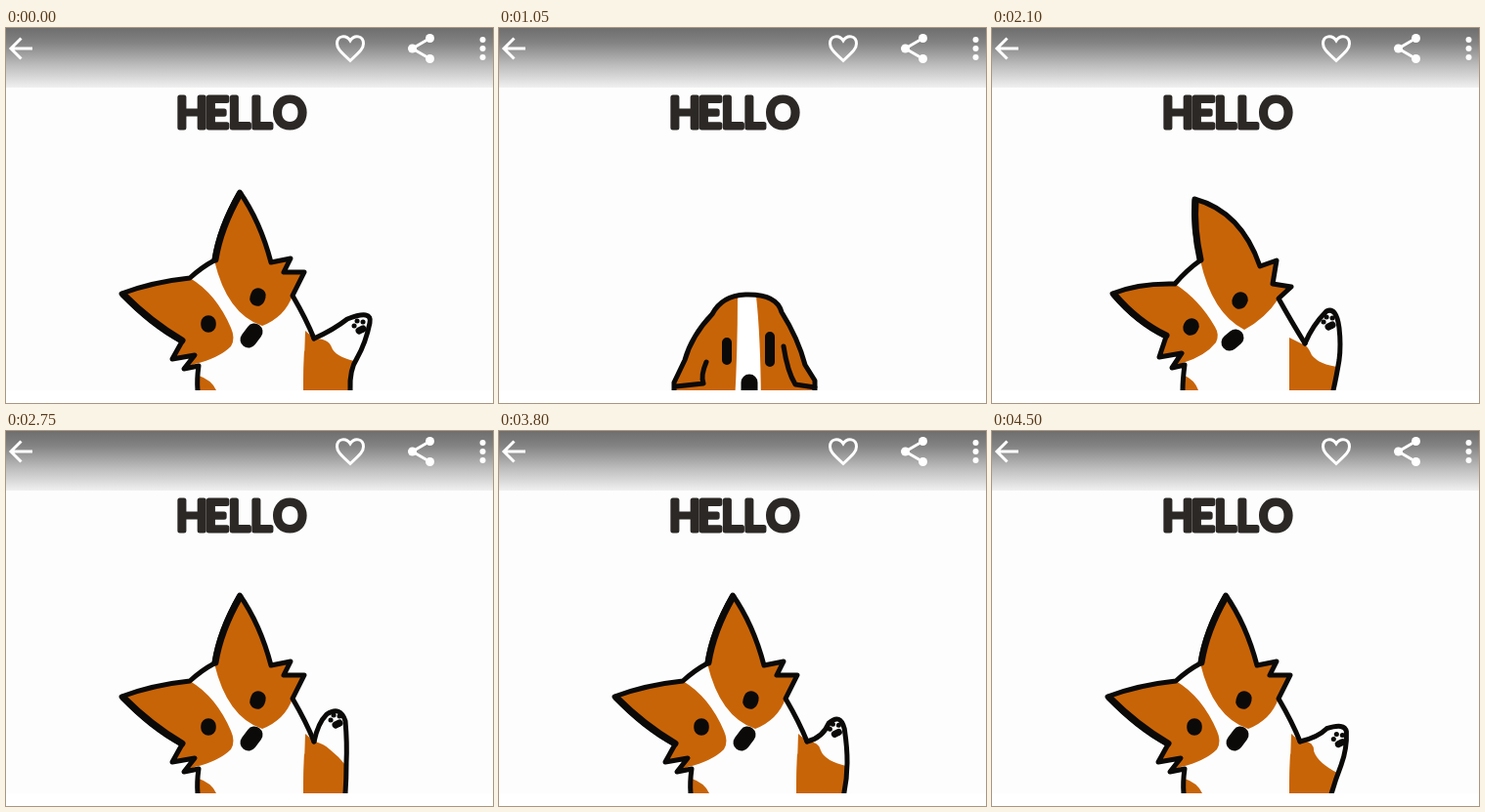
Recreate the animation shown at these times as an HTML page. Size 498 by 384 pixels, loop 4.55 s.

```html
<!DOCTYPE html>
<html lang="en">
<head>
<meta charset="utf-8">
<title>Waving corgi</title>
<style>
  html, body { margin: 0; width: 100%; height: 100%; overflow: hidden; background: #fff; }
  svg { display: block; width: 498px; height: 384px; }
  .fur { fill: #c86408; }
  .ink { fill: none; stroke: #0b0a09; stroke-width: 5; stroke-linecap: round; stroke-linejoin: round; }
  .bold { stroke-width: 7; }
  .slit { stroke-width: 10; }
  .eye { stroke-width: 15.5; }
  .nose { stroke-width: 17; }
  .icon { fill: none; stroke: #fff; stroke-width: 3; }
  .solid { fill: #fff; stroke: none; }
  text {
    font: 400 42px Lato, Inter, sans-serif;
    fill: #2b2826; stroke: #2b2826; stroke-width: 5; stroke-linejoin: round;
  }
</style>
</head>
<body>
<svg viewBox="0 0 498 384">
  <defs>
    <linearGradient id="shade" x2="0" y2="1">
      <stop offset="0" stop-color="#6e6e6e"/>
      <stop offset=".25" stop-color="#838383"/>
      <stop offset=".65" stop-color="#c0c0c0"/>
      <stop offset="1" stop-color="#f0f0f0"/>
    </linearGradient>
  </defs>
  <rect width="498" height="371" fill="#fcfdfc"/>
  <rect width="498" height="61" fill="url(#shade)"/>

  <g class="icon">
    <path d="M27 21H6M15.500 10.500L5 21L15.500 31.500"/>
    <path d="M352 33.500C341 23.500 338.500 20.500 338.500 16C338.500 7.500 348 6.500 352 13C356 6.500 365.500 7.500 365.500 16C365.500 20.500 363 23.500 352 33.500Z"/>
    <path d="M433.500 10.500L415.500 21L433.500 31.500"/>
    <g class="solid">
      <circle cx="433.500" cy="10.500" r="4.500"/>
      <circle cx="415.500" cy="21" r="4.500"/>
      <circle cx="433.500" cy="31.500" r="4.500"/>
      <circle cx="487.500" cy="12" r="3"/>
      <circle cx="487.500" cy="21" r="3"/>
      <circle cx="487.500" cy="30" r="3"/>
    </g>
  </g>
  <text x="174 203.500 227.500 250 273.500" y="102">HELLO</text>

  <g id="peek">
    <path class="fur" d="M178 400V363L190 340Q197 315 218 293Q228 274 252 273Q284 272 289 291Q306 318 313 345L323 361V400Z"/>
    <path fill="#fff" d="M244 275H263Q268 320 268 400H240Q244 340 244 275Z"/>
    <path class="ink" d="M179 371V363L190 340Q197 315 218 293Q228 274 252 273Q284 272 289 291Q306 318 313 345L323 361V371"/>
    <path class="ink" d="M212 342Q206 356 209 364L181 367M291 326Q295 352 303 365L323 368"/>
    <path class="ink slit" d="M233 322V340M277 316V342"/>
    <path class="ink nose" d="M256 363V400"/>
  </g>

  <g id="dog">
    <g id="arm">
      <path class="fur" id="sleeve"/>
      <path class="ink" id="paw"/>
      <g id="pads">
        <path class="ink" d="M-5 0h.1M-2 -5h.1M4 -4h.1"/>
        <path class="ink bold" d="M0 5L4 3"/>
      </g>
    </g>
    <path class="fur" id="belly"/>
    <path class="fur" id="left"/>
    <path class="fur" id="right"/>
    <path class="ink" id="outline"/>
    <path class="ink bold" id="rim"/>
    <path class="ink eye" id="eyes"/>
    <path class="ink nose" id="nose"/>
  </g>
  <rect y="371" width="498" height="13" fill="#fff"/>
</svg>
<script>
const LOOP = 4550, WAVE = 330;
const el = id => document.getElementById(id);

// Poses share one command structure, so any two can be blended.
const upright = {
  belly: 'M196 337Q205 350 211 371L189 371ZM321 329Q308 345 305 371L331 371Z',
  left: 'M192 177Q222 186 244 230Q248 265 247 300Q247 308 246 315Q220 319 196 309L181 302L185 295L171 289L193 281Q189 240 192 177Z',
  right: 'M268 235Q292 206 323 186Q328 230 324 276L338 291L320 300L319 301L318 302Q292 316 272 308Q267 270 268 235Z',
  outline: 'M188 371Q190 340 196 311L181 302L185 295L171 289L193 281Q189 240 192 177Q222 186 244 230Q258 237 271 232Q292 206 323 186Q328 230 324 276L338 291L318 301L333 311L325 317Q331 342 331 371',
  rim: 'M192 279Q189 240 193 179M245 231Q258 236 270 233',
  eyes: 'M230 278L229 281M286 282L287 282',
  nose: 'M255 311L264 311'
};
const lean = {
  belly: 'M197 356Q207 360 211 371L194 371ZM305 330Q304 345 304 371L331 371Z',
  left: 'M123 272Q150 261 187 262Q212 278 228 306Q233 314 229 322Q218 336 195 343L184 348L194 333L171 337L178 316Q148 302 123 272Z',
  right: 'M213 238Q205 205 207 175Q255 188 274 244L291 238L287 262L306 265L293 277Q280 297 258 309Q225 292 213 238Z',
  outline: 'M195 371Q195 360 197 345L184 348L194 333L171 337L178 316Q148 302 123 272Q150 261 187 262Q200 247 213 238Q205 205 207 175Q255 188 274 244L291 238L287 262L306 265L293 277Q307 302 320 323',
  rim: 'M178 315Q149 301 125 273M213 237Q206 205 208 177',
  eyes: 'M204 305L203 307M254 278L253 280',
  nose: 'M243 322L249 317'
};
const tilt = {
  belly: 'M197 356Q210 360 215 371L194 371ZM305 330Q304 345 304 371L331 371Z',
  left: 'M118 272Q150 260 188 256Q215 272 230 307Q235 318 230 326Q218 338 193 344L182 350L193 335L170 339L180 321Q148 304 118 272Z',
  right: 'M213 238Q218 205 239 168Q260 198 271 240L291 236L284 250L305 250L293 274Q285 296 262 305Q226 293 213 238Z',
  outline: 'M196 371Q195 360 197 346L182 349L193 335L170 339L180 321Q148 304 118 272Q150 260 188 256Q200 245 213 238Q218 205 239 168Q260 198 271 240L291 236L284 250L305 250L293 274Q307 298 315 318',
  rim: 'M180 320Q149 302 120 273M214 237Q219 205 239 170',
  eyes: 'M207 302L207 304M258 274L257 277',
  nose: 'M248 319L254 311'
};

const raised = {
  sleeve: 'M304 317L320 325Q323 326 327 335Q335 345 355 347L349 371L304 371Z',
  paw: 'M320 323Q328 304 342 290Q352 285 355 307Q357 325 355 340Q352 358 349 371',
  pads: 'translate(344 301)'
};
const swing = [
  { at: 0,
    sleeve: 'M306 310L315 318Q325 320 331 326Q340 333 347 342L347 371L304 371Z',
    paw: 'M315 318Q319 299 328 290Q342 281 347 297Q349 320 348 340Q348 356 347 371',
    pads: 'translate(337 296)' },
  { at: .29,
    sleeve: 'M306 310L315 318Q327 318 329 327Q333 338 356 343L353 371L304 371Z',
    paw: 'M315 318Q331 314 337 299Q349 288 353 305Q356 325 356 340Q356 356 353 371',
    pads: 'translate(343 305)' },
  { at: .66,
    sleeve: 'M306 310L315 318Q329 316 329 328Q333 340 354 351L347 371L304 371Z',
    paw: 'M315 318Q333 314 342 305Q360 299 362 308Q363 325 357 342Q351 358 347 371',
    pads: 'translate(354 316)' },
  { at: .98,
    sleeve: 'M306 310L315 318Q330 318 333 327Q336 336 356 341L352 371L304 371Z',
    paw: 'M315 318Q335 309 349 298Q375 288 372 302Q368 322 359 338Q351 350 352 371',
    pads: 'translate(361 305)' }
];

const ramp = (t, a, b) => Math.min(1, Math.max(0, (t - a) / (b - a)));
const ease = k => k * k * (3 - 2 * k);

function mixPath(a, b, k) {
  const nums = b.match(/[\d.]+/g);
  let i = 0;
  return a.replace(/[\d.]+/g, n => (+n + (nums[i++] - n) * k).toFixed(2));
}
function mix(a, b, k) {
  const out = {};
  for (const key in a) if (key !== 'at') out[key] = mixPath(a[key], b[key], k);
  return out;
}
function apply(parts) {
  for (const id in parts) el(id).setAttribute(id === 'pads' ? 'transform' : 'd', parts[id]);
}
const show = (id, on) => el(id).style.display = on ? '' : 'none';
const shift = (id, y) => el(id).setAttribute('transform', `translate(0 ${y})`);

function wavingArm(t) {
  const p = (1 - Math.cos((t - 2750) / WAVE * 2 * Math.PI)) / 2;
  const i = p < swing[1].at ? 0 : p < swing[2].at ? 1 : 2;
  const a = swing[i], b = swing[i + 1];
  return mix(a, b, ramp(p, a.at, b.at));
}

function draw(time) {
  let t = time % LOOP;
  const blank = t >= 550 && t < 900;
  if (t < 550) t += LOOP;
  const peeking = t < 1110;
  show('peek', !blank && peeking);
  show('dog', !blank && !peeking);
  if (blank) return;
  if (peeking) return shift('peek', 102 * (1 - ease(ramp(t, 890, 1040))));

  shift('dog', t < 1200 ? 50 - 56 * ramp(t, 1110, 1200) : -6 * (1 - ramp(t, 1200, 1300)));
  const settle = ease(ramp(t, 2120, 2250));
  apply(t < 2110 ? mix(upright, lean, ease(ramp(t, 1950, 2090))) : mix(lean, tilt, settle));

  show('arm', t >= 2020);
  if (t >= 2020) {
    shift('arm', 60 * (1 - ramp(t, 2020, 2090)));
    apply(mix(raised, wavingArm(t), settle));
  }
}

const start = performance.now();
function tick() {
  draw(performance.now() - start);
  requestAnimationFrame(tick);
}
tick();
</script>
</body>
</html>
```
